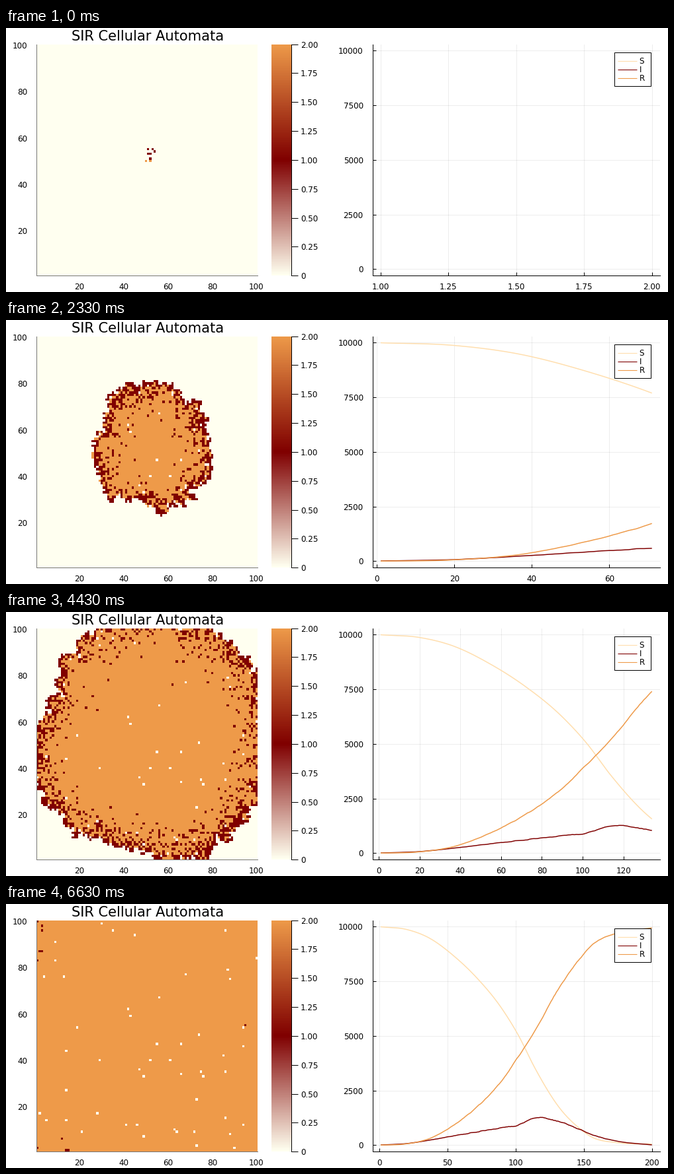
Recreate the animation shown at these times as a matplotlib script. Size 1000x400 px, loop 6.66 s.

```python
import numpy as np
import matplotlib.pyplot as plt
from matplotlib.animation import FuncAnimation
from matplotlib.colors import LinearSegmentedColormap
from matplotlib.patches import Rectangle

W, H, DPI = 1000, 400, 100
STEPS, SIZE = 200, 100
PX = 72 / DPI
IVORY, MAROON, ORANGE, SAND = "#FFFFF0", "#800000", "#EE9A49", "#FFDEAD"
CMAP = LinearSegmentedColormap.from_list("sir", [IVORY, MAROON, ORANGE], N=257)

# ---------- epidemic ----------
SICK = [(51, 55), (53, 55), (54, 54), (51, 53), (52, 53), (52, 51)]
CURED = [(50, 50), (52, 50)]
SPARED = 50  # cells that are never infected

# step, susceptible, infected
KEYS = np.array([
    (1, 9992, 6), (20, 9870, 72), (36, 9500, 220), (55, 8640, 425),
    (71, 7690, 600), (90, 6240, 795), (102, 5030, 925), (114, 3545, 1245),
    (133, 1640, 1055), (147, 760, 720), (155, 400, 508), (175, 110, 175),
    (200, SPARED, 10),
])


def mask(cells):
    m = np.zeros((SIZE, SIZE), int)
    for x, y in cells:
        m[y - 1, x - 1] = 1
    return m


def neighbours(m, reach):
    """Count marked cells around each cell: reach 1 is 4 cells, 2 is 8."""
    p = np.pad(m.astype(int), 1)
    return sum(p[1 + a:1 + a + SIZE, 1 + b:1 + b + SIZE]
               for a in (-1, 0, 1) for b in (-1, 0, 1)
               if 0 < abs(a) + abs(b) <= reach)


def hermite(t, x, y):
    """Smooth curve through key points."""
    slope = np.gradient(y.astype(float), x)
    i = np.clip(np.searchsorted(x, t, side="right") - 1, 0, len(x) - 2)
    h = x[i + 1] - x[i]
    u = (t - x[i]) / h
    return (y[i] + (y[i + 1] - y[i]) * u * u * (3 - 2 * u)
            + h * u * (1 - u) * (slope[i] * (1 - u) - slope[i + 1] * u))


def arrival_times(rng):
    """When the front should reach each cell: a dented, wavy disc."""
    y, x = np.mgrid[1:SIZE + 1, 1:SIZE + 1] - 52
    angle = np.degrees(np.arctan2(y, x)) % 360

    def dent(at, depth, width):
        return depth * np.exp(-((angle - at) / width) ** 2)

    speed = 0.44 * (1.04 - dent(157, .17, 18) - dent(255, .14, 25))
    waves = np.zeros((SIZE, SIZE))
    for _ in range(12):
        kx, ky, phase = rng.normal(0, .35), rng.normal(0, .35), rng.uniform(0, 6.3)
        waves += np.cos(kx * x + ky * y + phase)
    return np.hypot(x, y) / speed + 1.6 * waves


def simulate():
    rng = np.random.default_rng(7)
    t = np.arange(1, STEPS + 1)
    s_goal = np.maximum(hermite(t, KEYS[:, 0], KEYS[:, 1]), SPARED)
    i_goal = hermite(t, KEYS[:, 0], KEYS[:, 2])
    wobble = np.convolve(rng.normal(0, 20, STEPS), np.ones(3) / 3, "same")
    i_goal += wobble * np.clip(i_goal / 600, 0, 1)
    r_goal = SIZE * SIZE - s_goal - i_goal

    arrival = arrival_times(rng)
    ease = rng.lognormal(0, .8, (SIZE, SIZE))
    ease.flat[rng.choice(SIZE * SIZE, SPARED, replace=False)] = 0

    grid = mask(SICK) + 2 * mask(CURED)
    ease[grid > 0] = 1
    grids = [grid.copy()]
    for n in range(1, STEPS):
        able = np.flatnonzero(grid == 1)
        k = np.clip(int(r_goal[n]) - np.sum(grid == 2), 0, able.size)
        healed = rng.choice(able, k, replace=False)

        touch = neighbours(grid == 1, 1) + .03 * neighbours(grid > 0, 2)
        pull = np.exp(np.clip((n + 1 - arrival) / 8, -6, 6))
        rate = np.where(grid == 0, ease * touch * pull, 0)
        k = np.clip(np.sum(grid == 0) - int(s_goal[n]), 0, np.sum(rate > 0))
        wait = rng.exponential(size=grid.shape) / np.maximum(rate, 1e-12)
        caught = np.argsort(wait, axis=None)[:k]

        grid.flat[healed] = 2
        grid.flat[caught] = 1
        grids.append(grid.copy())
    return np.array(grids)


grids = simulate()
counts = [(grids == v).sum(axis=(1, 2)) for v in range(3)]


# ---------- ticks ----------
def nice_ticks(lo, hi):
    """Choose 4 to 8 round ticks by spacing, coverage and niceness."""
    best, pick = -1, None
    for z in range(-2, 4):
        for q, nice in ((1, 1), (5, .9), (2, .7), (2.5, .5), (3, .2)):
            step = q * 10.0 ** z
            a, b = np.ceil(lo / step - 1e-9), np.floor(hi / step + 1e-9)
            n = int(b - a) + 1
            if not 4 <= n <= 8:
                continue
            score = (0.25 * (1 - abs(n - 5) / 5) + (a <= 0) / 6
                     + 0.5 * (hi - lo) / ((n - 1) * step)
                     + 0.25 * nice - 1e-6 * n)
            if score > best:
                best, pick = score, (np.arange(n) * step + a * step + 0.0, step)
    ticks, step = pick
    digits = next(d for d in range(4)
                  if abs(step * 10 ** d - round(step * 10 ** d)) < 1e-9)
    return ticks, [f"{v:.{digits}f}" for v in ticks]


# ---------- stage ----------
plt.rcParams["font.family"] = "DejaVu Sans"
plt.rcParams["font.size"] = 12 * PX
fig = plt.figure(figsize=(W / DPI, H / DPI), dpi=DPI, facecolor="white")
TOP, TALL = 24.6, 350.6


def panel(x, w, show, color="black", y=TOP, h=TALL, **kw):
    ax = fig.add_axes([x / W, 1 - (y + h) / H, w / W, h / H], **kw)
    for side, spine in ax.spines.items():
        spine.set_visible(side in show)
        spine.set_linewidth(PX)
        spine.set_color(color)
    ax.tick_params(direction="in", width=PX, labelsize=12 * PX)
    ax.tick_params(axis="x", pad=10.3 * PX)
    ax.tick_params(axis="y", pad=14 * PX)
    return ax


# cell grid
cells = panel(46, 334, ("left", "bottom"), "#777777")
image = cells.imshow(grids[0], cmap=CMAP, vmin=0, vmax=2, origin="lower",
                     extent=(.5, 100.5, .5, 100.5), aspect="auto",
                     interpolation="nearest")
cells.set_xticks(range(20, 101, 20))
cells.set_yticks(range(20, 101, 20))
cells.tick_params(length=0)

# colour scale
scale = panel(401, 30, ("right",))
scale.imshow(np.linspace(0, 2, 350)[:, None], cmap=CMAP, origin="lower",
             extent=(0, 1, 0, 2), aspect="auto")
scale.set_xticks([])
levels = np.arange(0, 2.01, .25)
scale.yaxis.tick_right()
scale.set_yticks(levels, ["0"] + [f"{v:.2f}" for v in levels[1:]])
scale.tick_params(axis="y", direction="out", length=10 * PX, pad=4 * PX)

# curves
chart = panel(553.7, 434.3, ("left", "bottom"))
margin_y = 0.03 * 9990
chart.set_ylim(2 - margin_y, 9992 + margin_y)
chart.set_yticks(range(0, 10001, 2500))
chart.grid(color="black", alpha=.07, linewidth=PX)
chart.set_axisbelow(True)
chart.tick_params(length=5 * PX)
COLORS = (SAND, MAROON, ORANGE)
curves = [chart.plot([], [], color=c, lw=1.5 * PX, solid_capstyle="butt")[0]
          for c in COLORS]

# title and legend in pixel coordinates
page = panel(0, W, (), y=0, h=H, zorder=5)
page.set(xlim=(0, W), ylim=(H, 0))
page.axis("off")


def label(x, y, s, size, ha):
    page.text(x, y + .365 * size, s, size=size * PX, ha=ha, va="baseline")


label(214.3, 11, "SIR Cellular Automata", 21, "center")
page.add_patch(Rectangle((918.7, 36.6), 55, 51.6, fc="white", ec="black", lw=PX))
for row, (name, color) in enumerate(zip("SIR", COLORS)):
    y = 49.5 + 13 * row
    page.plot([923.5, 952.5], [y, y], color=color, lw=1.1 * PX,
              solid_capstyle="butt")
    label(956.5, y, name, 12, "left")


def draw(i):
    n = i + 1
    image.set_data(grids[i])
    for curve, c in zip(curves, counts):
        curve.set_data(np.arange(1, n + 1), c[:n])
    end = max(n, 2)
    margin = 0.03 * (end - 1)
    lo, hi = 1 - margin, end + margin
    chart.set_xticks(*nice_ticks(lo, hi))
    chart.set_xlim(lo, hi)
    return [image, *curves]


anim = FuncAnimation(fig, draw, frames=STEPS, interval=33.3, repeat=True)
plt.show()
```
